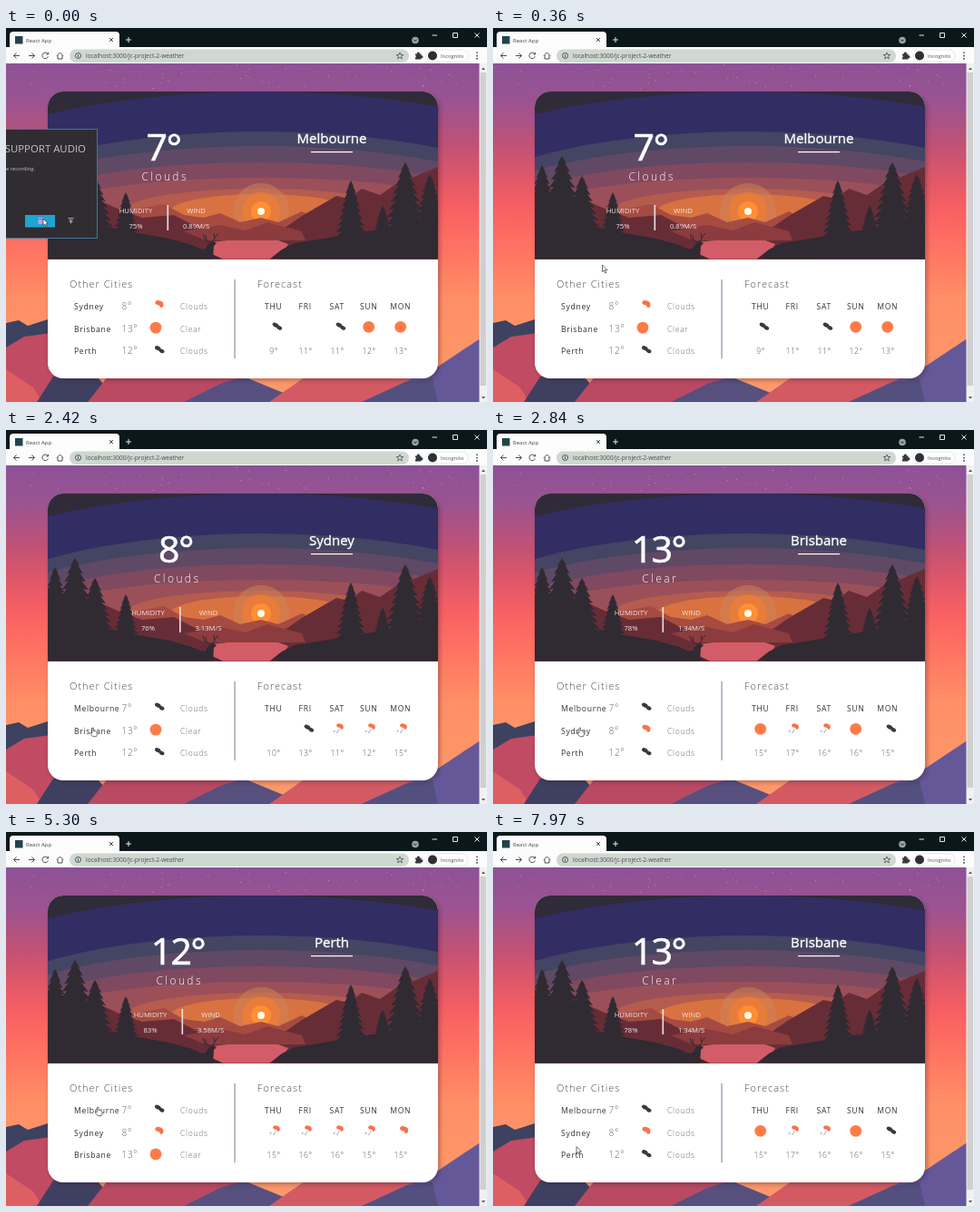
These frames come from a looping animation (530x412 px, 8 s). An HTML page:

```html
<!DOCTYPE html>
<html lang="en">
<head>
<meta charset="utf-8">
<title>Weather</title>
<style>
html, body { margin: 0; width: 100%; height: 100%; overflow: hidden; }
svg { display: block; width: 530px; height: 412px; font-family: "Open Sans", "Noto Sans", sans-serif; }
.mid { text-anchor: middle; }
.light { font-weight: 300; }
.row { font-size: 8.6px; letter-spacing: .7px; }
.line { fill: none; stroke: #4b4f50; stroke-width: 1; }
.firm { stroke: #fff; stroke-width: .35; }
</style>
</head>
<body>
<svg viewBox="0 0 530 412">
  <defs>
    <linearGradient id="dusk" x2="0" y2="1">
      <stop offset="0" stop-color="#8c5297"/>
      <stop offset=".12" stop-color="#9c5390"/>
      <stop offset=".24" stop-color="#c05275"/>
      <stop offset=".34" stop-color="#e05769"/>
      <stop offset=".44" stop-color="#f96163"/>
      <stop offset=".57" stop-color="#ff7762"/>
      <stop offset=".7" stop-color="#ff8f66"/>
      <stop offset="1" stop-color="#fb9a6a"/>
    </linearGradient>
    <clipPath id="photo"><path d="M46 254.600V87a17 17 0 0 1 17-17H459a17 17 0 0 1 17 17V254.600Z"/></clipPath>
    <filter id="blur"><feGaussianBlur stdDeviation="2.500"/></filter>

    <g id="dark" fill="#393a3b">
      <ellipse cx="2.300" cy="-1.600" rx="3.500" ry="2.300" transform="rotate(28 2.3 -1.6)"/>
      <ellipse cx="6.600" cy="1.500" rx="3" ry="2.100" transform="rotate(28 6.600 1.500)"/>
    </g>
    <g id="warm" fill="#fb7148">
      <ellipse cx="3.300" cy="-2" rx="4" ry="2.600" transform="rotate(12 3.300 -2)"/>
      <ellipse cx="6.200" cy="0" rx="2.200" ry="3.200"/>
    </g>
    <g id="rain">
      <use href="#warm" transform="translate(0 -1.500) scale(.85)"/>
      <path d="M-2.500 2l-1 2M1 3l-1 2M2.500 1l-1 1.500" stroke="#8b8d95"/>
    </g>
    <circle id="sun" cy=".5" r="6.400" fill="#ff7a47"/>
  </defs>

  <!-- page -->
  <rect y="39" width="530" height="373" fill="url(#dusk)"/>
  <g id="stars" fill="#f4cfc0"></g>
  <path d="M0 325L14 322L24 328L46 321V412H0Z" fill="#3d4260"/>
  <path d="M0 352L20 340L50 336V380L120 412H0Z" fill="#c14b62"/>
  <path d="M0 376L30 396L40 412H0Z" fill="#dd5f62"/>
  <path d="M34 412L52 384L100 384L126 412Z" fill="#3f4061"/>
  <path d="M90 412L112 384H250L300 412Z" fill="#b94a62"/>
  <path d="M196 412L236 392L262 384L330 412Z" fill="#57507f"/>
  <path d="M290 412L330 384H480L470 412Z" fill="#d35a62"/>
  <path d="M392 412L440 390L476 373L530 337V412Z" fill="#655899"/>
  <path d="M392 412L440 390L470 386L476 412Z" fill="#53507f"/>

  <!-- browser -->
  <rect width="530" height="22" fill="#0a181c"/>
  <path d="M0 21H4V8q0-4 4-4H121q4 0 4 4V21H530V39H0Z" fill="#fbfcfb"/>
  <rect x="10" y="9" width="8.500" height="8.500" fill="#23424c"/>
  <text x="22" y="15.500" font-size="6" fill="#444">React App</text>
  <path class="line" d="M114 11l4 4m0-4l-4 4"/>
  <path class="line" d="M132 13h6m-3-3v6M469.500 8h5.500M492.500 5.500h5v5h-5ZM516.500 5.500l5 5m0-5l-5 5" style="stroke:#e4e8e8"/>
  <circle cx="451" cy="13.500" r="3.800" fill="#9aa3a3"/>
  <path d="M449.300 12.700l1.700 1.800l1.700-1.800" fill="none" stroke="#172026"/>
  <path class="line" d="M15 30.500H8.500m3-3l-3 3l3 3M25 30.500h6.500m-3-3l3 3l-3 3M46 28.500a3.300 3.300 0 1 0 .4 3M46.500 27v2h-2M56 30.500l3.500-3.500l3.500 3.500M57 30v4h5v-4"/>
  <rect x="70" y="23.500" width="374" height="14.500" rx="7.200" fill="#cfd7d1"/>
  <circle class="line" cx="79.500" cy="30.500" r="3"/>
  <path class="line" d="M79.500 29v.8m0 .4v2"/>
  <text x="88" y="33" font-size="6.600" fill="#4a4d4e">localhost:3000/jc-project-2-weather</text>
  <path class="line" d="M434 27l1 2.500h2.800l-2.200 1.700l.8 2.700l-2.400-1.600l-2.400 1.600l.8-2.700l-2.200-1.700h2.800Z" style="stroke-width:.8"/>
  <path d="M451 28.500h2a1.400 1.400 0 1 1 2.600 0h1.900v2a1.400 1.400 0 1 1 0 2.600v1.400h-6.500v-2a1.300 1.300 0 0 0 0-2.400Z" fill="#34383a"/>
  <rect x="463" y="24" width="46" height="13" rx="6.500" fill="#fff" stroke="#dfe3e1" stroke-width=".7"/>
  <circle cx="470" cy="30.500" r="5" fill="#2c3033"/>
  <text x="479" y="32.500" font-size="5.800" fill="#4a4d4e">Incognito</text>
  <path d="M519 26.500v8.200" stroke="#4b4f50" stroke-width="1.600" stroke-dasharray="1.600 1.700"/>
  <rect x="521.500" y="39" width="8.500" height="373" fill="#f1f1f1"/>
  <rect x="522.500" y="49" width="6.500" height="345" fill="#d0d0d0"/>
  <path d="M524 46l2-2.500l2 2.500ZM524 406l2 2.500l2-2.500Z" fill="#555"/>

  <!-- card -->
  <rect x="48" y="73" width="430" height="315" rx="17" fill="#301828" opacity=".35" filter="url(#blur)"/>
  <rect x="46" y="70" width="430" height="316" rx="17" fill="#fff"/>
  <g clip-path="url(#photo)">
    <rect x="46" y="70" width="430" height="185" fill="#302b38"/>
    <g id="sky"></g>
    <circle cx="281" cy="202" r="31" fill="#cf8458" opacity=".5"/>
    <circle cx="281" cy="202" r="21" fill="#ee7c38" opacity=".8"/>
    <circle cx="281" cy="202" r="11" fill="#ff8e34"/>
    <circle cx="281" cy="202" r="4" fill="#fffbe9"/>
    <path d="M46 208L110 196L142 200L174 194L196 206L218 209L236 204L258 214L281 209L300 214L326 202L350 214V255H46Z" fill="#a54b42"/>
    <path d="M46 182L90 184L125 200L150 209L185 206L212 220L250 225L300 225L326 207L345 196L364 185L378 188L392 177L412 184L428 173L452 163L476 153V255H46Z" fill="#672d37"/>
    <path d="M196 224L236 217L264 223L288 214L326 224L330 234H220Z" fill="#8c3c3e"/>
    <path d="M206 255L226 236L244 234H300L311 238L300 255Z" fill="#d25c67"/>
    <path d="M46 206L80 210L112 219L140 225L180 232L205 239L240 255H46ZM476 207L440 218L390 225L350 232L318 237L304 244L290 255H476Z" fill="#302a32"/>
    <path id="trees" fill="#302a32"/>
    <path d="M206 255l3-10l10-2l5-6l4-2l4 2l-3 3l-1 15Z" fill="#302a32"/>
    <path d="M225 236l-6-3l-2-6m4 7l-1-6m7 8l3-4l-1-6m1 5l4-5" fill="none" stroke="#302a32"/>
  </g>

  <g fill="#fff" class="mid">
    <g id="now">
      <text id="temp" x="173.500" y="146" font-size="41" letter-spacing="-1.600" class="firm" style="stroke-width:.7"></text>
      <text id="sum" x="175.200" y="168" font-size="12" letter-spacing="2.400" class="light"></text>
      <g font-size="7.700" fill="#f1e6ea">
        <text x="143" y="204">HUMIDITY</text><text id="hum" x="143" y="221"></text>
        <text x="209.500" y="204">WIND</text><text id="wind" x="209.500" y="221"></text>
      </g>
      <rect x="177.500" y="195" width="1.600" height="28" fill="#eadfe2"/>
    </g>
    <text id="name" x="359" y="127" font-size="15" class="firm"></text>
    <rect x="336" y="136" width="46" height="1.200"/>
  </g>

  <g font-size="11" letter-spacing="1" fill="#4c4c4c" class="light">
    <text x="70" y="285.800">Other Cities</text><text x="277" y="285.800">Forecast</text>
  </g>
  <rect x="251.300" y="277" width="1.500" height="87" fill="#aba2b8"/>
  <g id="lists"></g>

  <g id="dialog">
    <rect x="-5" y="111.500" width="105.500" height="120" fill="#302d32" stroke="#347c96"/>
    <g text-anchor="end" fill="#c5c3c6">
      <text x="88" y="136.500" font-size="11.400">SUPPORT AUDIO</text>
      <text x="32" y="157" font-size="5.800">e recording.</text>
    </g>
    <rect x="21" y="206" width="33" height="13.500" fill="#20a4d2"/>
    <path d="M35 209.500h6m-5 2h4v4h-4Z" fill="#b6a6da" stroke="#b6a6da"/>
    <path d="M68.500 209.500h6m-5 2h4m-4 2h4m-2-2v4" stroke="#aaa8ab" fill="none"/>
  </g>

  <g id="cursor" fill="#fff" stroke="#333" stroke-width=".7">
    <path id="arrow" d="M0 0V7.500L1.800 6L3 9L4.300 8.400L3.100 5.600H5.500Z"/>
    <path id="hand" d="M2.300 5V1q0-1 .9-1t.9 1V3.500q1-.5 1.300.3q1-.4 1.300.4q1.200-.2 1.200 1V7.500L7 9.700H3.300L.4 6.400Q.2 5 1.300 5.200L2.300 6Z"/>
  </g>
</svg>
<script>
const $ = id => document.getElementById(id);
const cities = [
  { name: "Melbourne", temp: 7, sum: "Clouds", icon: "dark", hum: 75, wind: "0.89", shift: 0,
    days: [["dark", 9], ["", 11], ["dark", 11], ["sun", 12], ["sun", 13]] },
  { name: "Sydney", temp: 8, sum: "Clouds", icon: "warm", hum: 76, wind: "3.13", shift: 13.5,
    days: [["", 10], ["dark", 13], ["rain", 11], ["rain", 12], ["rain", 15]] },
  { name: "Brisbane", temp: 13, sum: "Clear", icon: "sun", hum: 78, wind: "1.34", shift: 9,
    days: [["sun", 15], ["rain", 17], ["rain", 16], ["sun", 16], ["dark", 15]] },
  { name: "Perth", temp: 12, sum: "Clouds", icon: "dark", hum: 83, wind: "3.58", shift: 16,
    days: [["rain", 15], ["rain", 16], ["rain", 16], ["rain", 15], ["warm", 15]] }
];
// [time, city index]
const clicks = [[0, 0], [1380, 1], [2840, 2], [4350, 3], [6140, 0], [7590, 2]];
// [time, x, y]
const path = [
  [0, 41, 210], [30, 41, 210], [360, 120.5, 261], [440, 120.5, 261], [820, 96.5, 303],
  [1860, 96.5, 303], [2420, 92.5, 328], [3480, 92.5, 328], [3870, 86.5, 350.5],
  [4990, 86.5, 350.5], [5140, 78, 328], [5300, 98, 303], [6520, 98, 303],
  [6640, 80, 316], [6760, 94, 328], [7810, 94, 328], [7970, 92, 346.5], [8000, 92, 346.5]
];

// sky bands around the sun: rx, ry, colour
$("sky").innerHTML = [
  [400, 132, "#322d62"], [320, 88, "#444463"], [300, 72, "#5f4965"], [270, 54, "#80495f"],
  [235, 37, "#9b5059"], [150, 25, "#b55c4e"], [100, 19, "#d87240"]
].map(([rx, ry, c]) => `<ellipse cx="281" cy="202" rx="${rx}" ry="${ry}" fill="${c}"/>`).join("");

function tree(x, top, base, w) {
  const n = 9, left = [], right = [];
  for (let i = 1; i <= n; i++) {
    const y = top + (base - top) * i / n, r = w * (i / n) ** .75;
    left.push(`${x - r} ${y}L${x - r * .62} ${y - 1}`);
    right.unshift(`${x + r * .62} ${y - 1}L${x + r} ${y}`);
  }
  return `M${x} ${top}L${left.join("L")}L${right.join("L")}Z`;
}
$("trees").setAttribute("d", [
  [76, 141, 220, 27], [54, 151, 215, 20], [98, 163, 226, 22], [132, 181, 230, 15],
  [440, 148, 226, 25], [380, 168, 232, 18], [467, 161, 222, 19], [415, 196, 228, 11]
].map(t => tree(...t)).join(""));

let seed = 7;
const rnd = () => (seed = seed * 16807 % 2147483647) / 2147483647;
$("stars").innerHTML = Array.from({ length: 60 }, () =>
  `<circle cx="${rnd() * 520}" cy="${41 + rnd() * 26}" r=".5" opacity="${.25 + rnd() * .5}"/>`).join("");

const text = (x, y, s, fill, cls, more = "") =>
  `<text x="${x}" y="${y}" fill="${fill}" class="row ${cls}" ${more}>${s}</text>`;
const icon = (id, x, y) => id && `<use href="#${id}" x="${x}" y="${y}"/>`;

function show(city) {
  $("now").setAttribute("transform", `translate(${city.shift})`);
  $("temp").textContent = city.temp + "°";
  $("sum").textContent = city.sum;
  $("hum").textContent = city.hum + "%";
  $("wind").textContent = city.wind + "M/S";
  $("name").textContent = city.name;
  const rows = cities.filter(c => c != city).map((c, i) => {
    const y = 309.8 + i * 24.8;
    return text(75, y, c.name, "#303030", "") +
      text(127.5, y, c.temp + "°", "#666", "light", 'style="font-size:10px"') +
      icon(c.icon, 165, y - 5) + text(192, y, c.sum, "#6c6c6c", "light");
  });
  const days = city.days.map(([id, temp], i) => {
    const x = 294.7 + i * 35;
    return text(x, 309.8, ["THU", "FRI", "SAT", "SUN", "MON"][i], "#333", "mid") +
      icon(id, x, 328.8) + text(x + .5, 359.4, temp + "°", "#555", "mid light");
  });
  $("lists").innerHTML = rows.join("") + days.join("");
}

let shown;
function frame(now) {
  const t = now % 8000;
  const city = cities[clicks.findLast(c => c[0] <= t)[1]];
  if (city != shown) show(shown = city);
  $("dialog").style.display = t < 30 ? "" : "none";

  const i = path.findIndex(p => p[0] > t);
  const [t0, x0, y0] = path[i - 1], [t1, x1, y1] = path[i];
  const k = (t - t0) / (t1 - t0);
  const x = x0 + (x1 - x0) * k, y = y0 + (y1 - y0) * k;
  const link = y > 299 && (y - 299) % 24.8 < 12;
  $("cursor").setAttribute("transform", `translate(${x} ${y})`);
  $("hand").style.display = link ? "" : "none";
  $("arrow").style.display = link ? "none" : "";
  requestAnimationFrame(frame);
}
requestAnimationFrame(frame);
</script>
</body>
</html>
```
